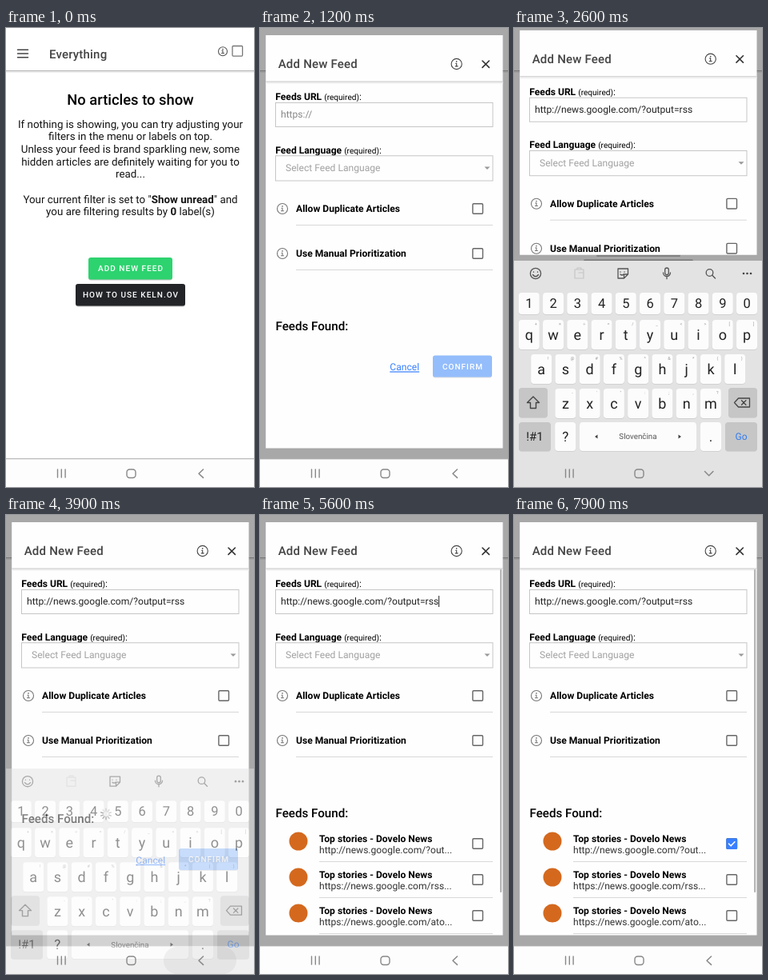
Recreate the animation shown at these times as an HTML page. Size 310 by 574 pixels, loop 8000 ms.

```html
<!DOCTYPE html>
<html lang="en">
<head>
<meta charset="utf-8">
<title>Add new feed</title>
<style>
html, body { margin: 0; width: 100%; height: 100%; overflow: hidden; background: #fff; }
svg { display: block; font-family: Roboto, "Open Sans", sans-serif; text-rendering: geometricPrecision; }
.mid { text-anchor: middle; }
.b { font-weight: 700; }
.m { font-weight: 500; }
.t { font-size: 12.1px; }
.title { font-size: 15.03px; font-weight: 500; letter-spacing: .19px; fill: #444; }
.btn { font-size: 10.05px; font-weight: 500; letter-spacing: 1px; fill: #fff; }
.line { fill: none; stroke-linecap: round; stroke-linejoin: round; }
</style>
</head>
<body>
<svg id="stage" width="310" height="574" viewBox="0 0 310 574"></svg>
<script>
const LOOP = 8000;
const URL_TEXT = 'http://news.google.com/?output=rss';

const text = (x, y, str, cls = '', extra = '') =>
  `<text x="${x}" y="${y}" class="${cls}" ${extra}>${str}</text>`;
const rect = (x, y, w, h, fill, extra = '') =>
  `<rect x="${x}" y="${y}" width="${w}" height="${h}" fill="${fill}" ${extra}/>`;
const path = (d, stroke = '#666', width = 1.2, extra = '') =>
  `<path class="line" d="${d}" stroke="${stroke}" stroke-width="${width}" ${extra}/>`;
const info = (x, y, r, color) =>
  `<circle cx="${x}" cy="${y}" r="${r}" fill="none" stroke="${color}" stroke-width="1.1"/>` +
  path(`M${x - 1} ${y - .8}h1v${r * .55}m-1.5 0h3`, color, 1.1) +
  `<circle cx="${x}" cy="${y - r * .48}" r=".85" fill="${color}"/>`;
const box = (x, y) => rect(x - 6.3, y - 6.3, 12.6, 12.6, 'none', 'rx="1.2" stroke="#666" stroke-width="1.4"');
const label = (y, str) => text(19.3, y,
  `<tspan class="b">${str}</tspan> <tspan font-size="10.1">(required)</tspan>:`, 't');
const button = (x, y, w, h, fill, str, shade = .25) =>
  rect(x, y + 1, w, h, '#000', `rx="3" opacity="${shade}"`) + rect(x, y, w, h, fill, 'rx="3"') +
  text(x + w / 2 + .5, y + h / 2 + 3.6, str, 'btn mid');

function page() {
  const body = [
    'If nothing is showing, you can try adjusting your',
    'filters in the menu or labels on top.',
    'Unless your feed is brand sparkling new, some',
    'hidden articles are definitely waiting for you to',
    'read...', '',
    'Your current filter is set to "<tspan class="b">Show unread</tspan>" and',
    'you are filtering results by <tspan class="b">0</tspan> label(s)'
  ];
  return rect(0, 0, 310, 574, '#fff') +
    path('M14.5 27.2h13M14.5 32h13M14.5 36.8h13', '#444', 1.5) +
    text(54, 38.4, 'Everything', 'title') + info(271, 29.3, 5.5, '#555') +
    rect(283, 22.5, 12.6, 12.6, 'none', 'rx="1" stroke="#777" stroke-width="1.3"') +
    rect(0, 53, 310, 1.3, '#b4b4b4') + rect(0, 54.3, 310, 1.7, '#ececec') +
    text(155.5, 96, 'No articles to show', 'mid m', 'font-size="18.35"') +
    body.map((s, i) => text(155.5, 124.8 + i * 15.62, s, 'mid', 'font-size="13.36" fill="#151515"')).join('') +
    button(103, 287, 105, 27.5, '#2dd36f', 'ADD NEW FEED') +
    button(87, 320, 137, 27.5, '#222428', 'HOW TO USE KELN.OV');
}

const loader = () =>
  rect(102, 246, 109, 49, '#fafafa', 'rx="2"') +
  path('M120.5 268a6.5 6.5 0 0 0 11 5', '#3880ff', 1.4, 'id="arc"') +
  text(149, 270.6, 'Loading...', '', 'font-size="10" fill="#444"');

function option(y, str) {
  return info(28, y, 6.5, '#777') + text(45, y + 4.2, str, 't b') + box(272.2, y) +
    rect(45, y + 20, 246, .9, '#d4d4d4');
}

function result(y, tail) {
  return `<circle cx="48" cy="${y - 3}" r="11.5" fill="#d4691e"/>` +
    text(74, y - 2.5, 'Top stories - Dovelo News', 't b') +
    text(74, y + 11.5, `http${tail}...`, 't', 'fill="#333"') + box(272.2, y) +
    rect(74, y + 22, 217, .9, '#d4d4d4');
}

function modal() {
  return rect(7, 9, 297, 517, '#fefefe') + text(22.7, 50.3, 'Add New Feed', 'title') +
    info(245.7, 45, 6.6, '#444') + path('M278 41l8.4 8.4M286.4 41l-8.4 8.4', '#333', 1.6) +
    rect(7, 66.5, 297, 1.3, '#cdcdcd') + rect(7, 67.8, 297, 1.7, '#f0f0f0') +
    label(90.3, 'Feeds URL') +
    rect(19.5, 93.5, 271.5, 30, 'none', 'stroke="#c6c6c6"') +
    text(26, 112.3, '', 't', 'id="url"') + rect(0, 101, 1, 14, '#222', 'id="caret"') +
    label(156.5, 'Feed Language') +
    rect(19.5, 159.8, 271.5, 31.2, 'none', 'stroke="#c6c6c6"') +
    text(32, 179.2, 'Select Feed Language', 't', 'fill="#a2a2a2"') +
    '<path d="M280.5 173.5h7l-3.5 3.5z" fill="#999"/>' +
    option(226, 'Allow Duplicate Articles') + option(282, 'Use Manual Prioritization') +
    '<g id="foot">' + text(19.5, 377.6, 'Feeds Found:', 'm', 'font-size="15.15"') +
    '<g id="actions">' + text(162.3, 428.4, 'Cancel', 't', 'fill="#3880ff" text-decoration="underline"') +
    button(216, 409.5, 74, 27, '#94bdfb', 'CONFIRM', .12) + '</g></g>' +
    '<g id="spin">' + Array.from({ length: 10 }, (_, i) =>
      path('M0 -3.6V-6.8', '#444', 1.3, `transform="rotate(${i * 36})" opacity="${.25 + i * .075}"`)).join('') + '</g>' +
    '<g id="results">' + result(411, '://news.google.com/?out') + result(456, 's://news.google.com/rss') +
    result(501, 's://news.google.com/ato') + rect(300, 68, 2.2, 404, '#b5b5b5', 'rx="1"') +
    '<g id="check">' + rect(265.3, 404.2, 13.8, 13.8, '#3880ff', 'rx="1.5"') +
    path('M268.6 411.2l2.5 2.6 4.8-5', '#fff', 1.6) + '</g></g>';
}

function keyboard() {
  const dark = '#c6c6c7';
  const key = (x, y, w, h, str, size, fill = '#fcfcfc', ink = '#222') =>
    rect(x, y + .8, w, h, '#cbcbcb', 'rx="4"') + rect(x, y, w, h, fill, 'rx="4"') +
    text(x + w / 2, y + h / 2 + size * .35, str, 'mid', `font-size="${size}" fill="${ink}"`);
  const row = (keys, hints, x0, y, h, size) => [...keys].map((k, i) => {
    const x = x0 + i * 30.25;
    const hint = hints[i] ? text(x + 21.5, y + 6.5, hints[i].replace('&', '&amp;').replace('<', '&lt;'), 'mid', 'font-size="5.5" fill="#999"') : '';
    return key(x, y, 26, h, k, size) + hint;
  }).join('');
  return rect(0, 291, 310, 283, '#e3e3e4') +
    '<circle cx="27" cy="307" r="6.6" fill="none" stroke="#555" stroke-width="1.3"/>' +
    path('M24.5 305v.2M29.5 305v.2M23.5 308.5q3.5 4.5 7 0', '#555', 1.4) +
    path('M76 302h11v11h-11zM79 302v-2h5v2M81 306h6v7', '#c6c6c6') +
    path('M130 301h12.5v7l-5 5H130zM142 308h-4.5v5M133 305v.2M138 305v.2M133 308q2 2 4 0', '#555', 1.3) +
    path('M191 300a2.3 2.3 0 0 1 2.3 2.3v4a2.3 2.3 0 0 1-4.6 0v-4A2.3 2.3 0 0 1 191 300M186.5 306a4.5 4.5 0 0 0 9 0M191 310.5v3.2', '#555', 1.3) +
    '<circle cx="244.5" cy="306" r="4.3" fill="none" stroke="#555" stroke-width="1.3"/>' + path('M247.8 309.3l3.7 3.7', '#555', 1.4) +
    [287, 291.5, 296].map(x => `<circle cx="${x}" cy="307" r="1.3" fill="#444"/>`).join('') +
    row('1234567890', '', 5.8, 331, 27, 16.5) +
    row('qwertyuiop', '+×÷=/_<>[]', 5.8, 365, 37, 18) +
    row('asdfghjkl', '!@#%^&*()', 21.2, 408, 37, 18) +
    row('zxcvbnm', '-\'":;,?', 51.4, 451, 37, 18) +
    key(6, 450, 36, 37, '', 16, dark) + path('M24 461l-7.5 7.5h4v7h7v-7h4z', '#444', 1.4) +
    key(268, 450, 36, 37, '', 16, dark) + path('M275.5 468.5l5-5.5h14v11h-14zM284.5 465.8l5.4 5.4M289.9 465.8l-5.4 5.4', '#444', 1.3) +
    key(6, 493, 40, 36, '!#1', 15, dark) + key(51.2, 493, 26, 36, '?', 17) +
    key(82, 493, 146, 36, 'Slovenčina', 9.8, '#fcfcfc', '#555') +
    '<path d="M104.5 508.5v5l-3.5-2.5zM205.5 508.5v5l3.5-2.5z" fill="#444"/>' +
    key(233, 493, 26, 36, '.', 17) + key(264, 493, 40, 36, 'Go', 12, dark, '#2f7cf0');
}

const nav = () =>
  rect(197, 540, 91, 34, '#777', 'rx="17" id="press"') +
  path('M64.5 552v10M69.3 552v10M74.1 552v10', '#888', 1.4) +
  rect(151, 552, 11, 10.5, 'none', 'rx="3.5" stroke="#888" stroke-width="1.4"') +
  path('M246.5 552l-5.5 5.2 5.5 5.2', '#888', 1.5, 'id="back"') +
  path('M238.5 554.5l5.2 5.2 5.2-5.2', '#888', 1.5, 'id="down"');

document.getElementById('stage').innerHTML =
  page() + rect(0, 0, 310, 539.5, '#000', 'id="dim"') +
  '<g id="peek">' + rect(0, 280, 310, 12, '#a8a8a8') +
  rect(103, 283.5, 105, 2.5, '#808080', 'rx="1.2"') + rect(87, 289.5, 137, 3, '#777', 'rx="1.5"') + '</g>' +
  `<g id="loader">${loader()}</g>` +
  `<g id="dialog"><svg id="view" x="7.2" y="9" width="296.3" height="516.6"><g transform="translate(-7.2 -9)">${modal()}</g></svg></g>` +
  rect(0, 538.2, 310, 1.3, '#acacac') + rect(0, 539.5, 310, 34.5, '#fdfdfd') +
  `<g id="keys">${keyboard()}</g>` + nav();

const el = {};
document.querySelectorAll('[id]').forEach(e => el[e.id] = e);

// Linear interpolation through [time, value] steps
function track(t, steps) {
  if (t <= steps[0][0]) return steps[0][1];
  for (let i = 1; i < steps.length; i++) {
    const [a, u] = steps[i - 1], [b, v] = steps[i];
    if (t < b) return u + (v - u) * (t - a) / (b - a);
  }
  return steps[steps.length - 1][1];
}
const fade = (e, v) => e.setAttribute('opacity', v);
const show = (e, on) => e.setAttribute('visibility', on ? 'inherit' : 'hidden');
const move = (e, v) => e.setAttribute('transform', v);

function draw(t) {
  fade(el.dim, track(t, [[600, 0], [700, .12], [900, .34]]));
  fade(el.loader, track(t, [[600, 0], [700, .6], [800, 1], [900, 1], [1020, 0]]));
  move(el.arc, `rotate(${(t - 700) * .36} 126.5 268)`);

  const enter = track(t, [[900, 0], [1150, 1]]);
  fade(el.dialog, enter);
  move(el.dialog, `translate(0 ${40 * (1 - enter) ** 3})`);

  const up = track(t, [[1450, 0], [1750, 1], [3750, 1], [4050, 0]]);
  fade(el.keys, up);
  move(el.keys, `translate(0 ${52 * (1 - up)})`);
  const squeezed = t >= 1750 && t < 3750;
  el.view.setAttribute('y', squeezed ? 2.7 : 9);
  el.view.setAttribute('height', squeezed ? 281 : 516.6);
  show(el.peek, squeezed);
  show(el.down, squeezed);
  show(el.back, !squeezed);
  fade(el.press, track(t, [[3650, 0], [3750, .15], [3900, .1], [4150, 0]]));

  const typed = Math.round(track(t, [[1900, 0], [2500, URL_TEXT.length]]));
  const value = typed ? URL_TEXT.slice(0, typed) : 'https://';
  if (el.url.textContent !== value) el.url.textContent = value;
  el.url.setAttribute('fill', typed ? '#222' : '#888');
  el.caret.setAttribute('x', 26 + (typed ? el.url.getComputedTextLength() : 0));
  const blink = t < 4000 ? t % 1000 < 500 : (t + 600) % 1000 < 500;
  show(el.caret, t >= 1450 && t < 6900 && blink);

  const searching = t >= 2700 && t < 5300, found = t >= 5300;
  move(el.foot, `translate(0 ${searching ? 7.5 : 0})`);
  show(el.actions, !found);
  show(el.spin, searching);
  move(el.spin, `translate(125 374) rotate(${Math.floor(t / 100) * 36})`);
  show(el.results, found);
  show(el.check, t >= 6900);
}

const start = performance.now();
function tick(now) {
  draw(Math.max(0, now - start) % LOOP);
  requestAnimationFrame(tick);
}
draw(0);
requestAnimationFrame(tick);
</script>
</body>
</html>
```
